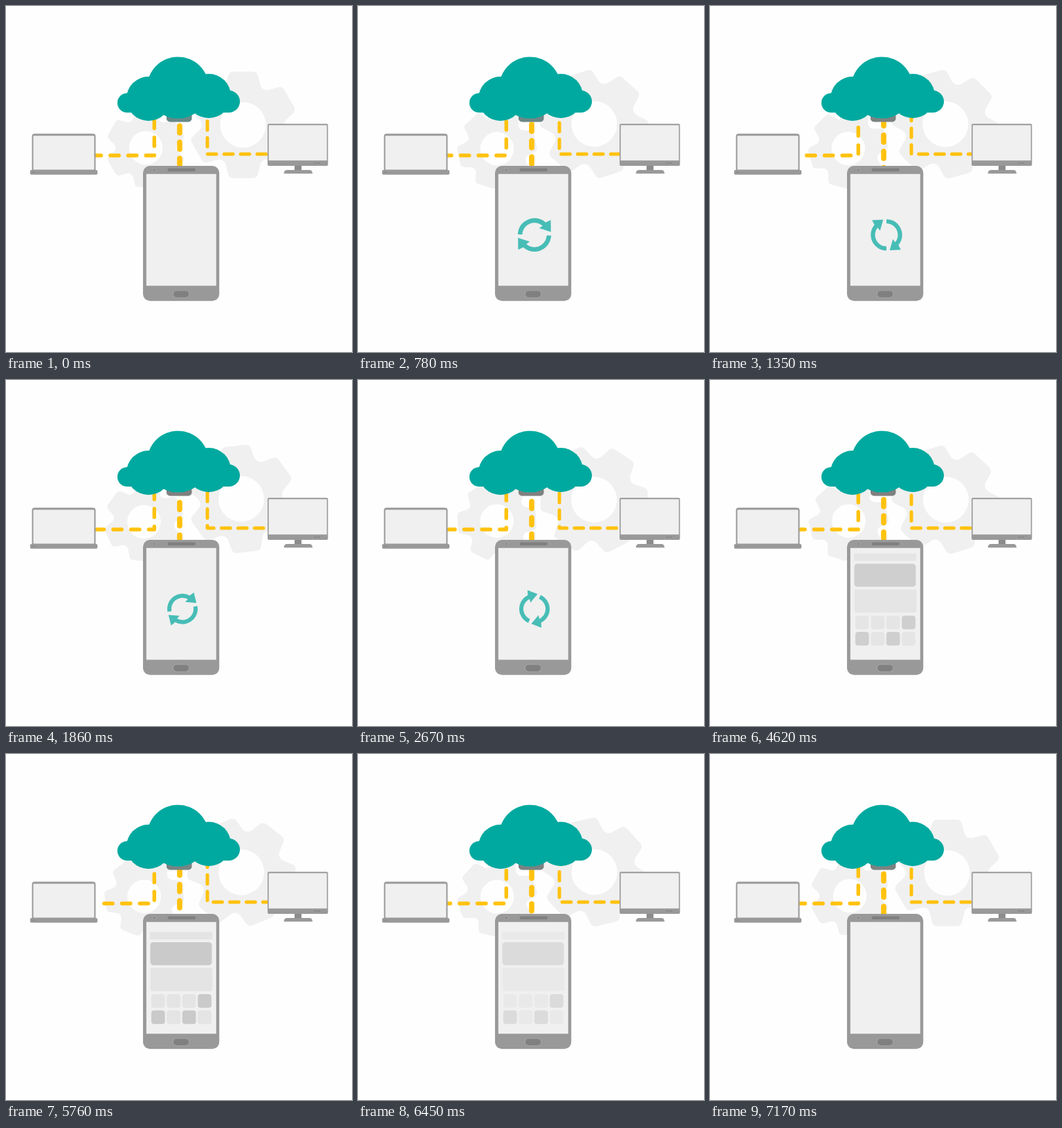
Recreate the animation shown at these times as an HTML page with a canvas. Size 500 px wide and 500 px high, loop 7230 ms.

```html
<!DOCTYPE html>
<html lang="en">
<head>
<meta charset="utf-8">
<title>Cloud sync</title>
<style>
html, body { margin: 0; width: 100%; height: 100%; overflow: hidden; background: #fefefe; }
canvas { display: block; width: 500px; height: 500px; }
</style>
</head>
<body>
<canvas id="stage"></canvas>
<script>
const LOOP = 7230, STEP = 30, LAST = 7170, TURN = 3600;
const TEAL = '#00a99f', YELLOW = '#ffc20e', GREY = '#999', DARK = '#808080', PALE = '#f0f0f0';
const TAU = Math.PI * 2, RAD = Math.PI / 180;

const canvas = document.getElementById('stage');
const ctx = canvas.getContext('2d');
const dpr = window.devicePixelRatio || 1;
canvas.width = canvas.height = 500 * dpr;

// Piecewise linear value from [time, value] pairs
function track(t, keys) {
  if (t <= keys[0][0]) return keys[0][1];
  for (let i = 1; i < keys.length; i++) {
    const [t0, a] = keys[i - 1], [t1, b] = keys[i];
    if (t <= t1) return a + (b - a) * (t - t0) / (t1 - t0);
  }
  return keys[keys.length - 1][1];
}

function box(x0, y0, x1, y1, r, color) {
  ctx.fillStyle = color;
  ctx.beginPath();
  ctx.roundRect(x0, y0, x1 - x0, y1 - y0, r);
  ctx.fill();
}

function disc(x, y, r, color) {
  ctx.fillStyle = color;
  ctx.beginPath();
  ctx.arc(x, y, r, 0, TAU);
  ctx.fill();
}

function polar(angle, r) {
  return [Math.cos(angle) * r, Math.sin(angle) * r];
}

// Six rounded teeth and a round hole; the pivot sits slightly off centre
function gear(x, y, scale, angle) {
  const pts = [];
  for (let i = 0; i < 6; i++) {
    const a = -Math.PI / 2 + i * TAU / 6;
    pts.push([...polar(a - 14.6 * RAD, 79.6), 8]);
    pts.push([...polar(a + 14.6 * RAD, 79.6), 8]);
    pts.push([...polar(a + 30 * RAD, 55), 10]);
  }
  ctx.save();
  ctx.translate(x, y);
  ctx.rotate(angle);
  ctx.translate(1.3, 0);
  ctx.scale(scale, scale);
  ctx.beginPath();
  const n = pts.length;
  ctx.moveTo((pts[0][0] + pts[n - 1][0]) / 2, (pts[0][1] + pts[n - 1][1]) / 2);
  pts.forEach((p, i) => {
    const q = pts[(i + 1) % n];
    ctx.arcTo(p[0], p[1], q[0], q[1], p[2]);
  });
  ctx.closePath();
  ctx.moveTo(33, 0);
  ctx.arc(0, 0, 33, 0, TAU);
  ctx.fillStyle = PALE;
  ctx.fill('evenodd');
  ctx.restore();
}

// Dashes centred at "first", moved by a number of periods along the path
function dashes(points, width, period, first, shift) {
  const visible = 17.8, dash = visible - width;
  ctx.strokeStyle = YELLOW;
  ctx.lineWidth = width;
  ctx.lineCap = ctx.lineJoin = 'round';
  ctx.setLineDash([dash, period - dash]);
  ctx.lineDashOffset = dash / 2 - first - shift * period;
  ctx.beginPath();
  points.forEach(([x, y]) => ctx.lineTo(x, y));
  ctx.stroke();
  ctx.setLineDash([]);
}

function cloud(t) {
  const glow = track(t, [[0, .21], [780, .16], [1500, 0], [5000, 0], [5760, .09], [LAST, .05]]);
  box(232, 145, 268.5, 167.5, 5, DARK);
  ctx.globalAlpha = glow;
  box(232, 145, 268.5, 167.5, 5, TEAL);
  ctx.globalAlpha = 1;
  disc(175, 140, 14, TEAL);
  disc(206, 134, 32, TEAL);
  disc(248.5, 118, 44.6, TEAL);
  disc(293, 130, 32, TEAL);
  disc(322, 138, 16, TEAL);
  box(175, 125, 322, 154, 0, TEAL);
}

function laptop() {
  box(37.5, 184.5, 129.5, 240, [4, 4, 0, 0], GREY);
  box(39.5, 187.5, 127.5, 236.5, 1, PALE);
  box(34.8, 237, 132.2, 243.7, 2, GREY);
  box(38, 239.8, 42, 240.8, .5, DARK);
}

function monitor() {
  box(417, 229, 427, 238, 0, '#8c8c8c');
  ctx.fillStyle = GREY;
  ctx.beginPath();
  ctx.moveTo(401.5, 242.3);
  ctx.quadraticCurveTo(402, 237, 406, 237);
  ctx.lineTo(438.5, 237);
  ctx.quadraticCurveTo(442.5, 237, 443, 242.3);
  ctx.fill();
  box(378, 170.3, 465.3, 231, 2, GREY);
  box(379.6, 172.2, 463.7, 223.2, .5, PALE);
  for (const x of [446.5, 449.8, 453]) disc(x, 227, 1, DARK);
}

function phone() {
  box(198, 231, 308.2, 426.3, 10, GREY);
  box(202.8, 242.8, 303.8, 404.3, 0, PALE);
  box(233.5, 234.4, 274, 239, 2.3, DARK);
  disc(214.2, 236.8, 2.2, '#adadad');
  disc(214.2, 236.8, 1.6, DARK);
  box(241.2, 410.8, 265, 421.6, 5, '#aaa');
  box(241.9, 411.5, 264.3, 420.9, 4.4, DARK);
}

function syncIcon(t) {
  const alpha = track(t, [[420, 0], [680, .7], [3300, .7], [3680, 0]]);
  const scale = track(t, [[420, 0], [680, 1.2], [780, 1.1], [1600, 1]]);
  if (alpha <= 0 || scale <= 0) return;
  ctx.save();
  ctx.translate(255, 330.8);
  ctx.rotate(Math.max(0, t - 780) * .1545 * RAD);
  ctx.scale(scale, scale);
  ctx.globalAlpha = alpha;
  ctx.fillStyle = TEAL;
  ctx.beginPath();
  for (const turn of [0, Math.PI]) {
    const at = (x, y) => [
      x * Math.cos(turn) - y * Math.sin(turn),
      x * Math.sin(turn) + y * Math.cos(turn)
    ];
    const from = turn + 182 * RAD, to = turn + 312 * RAD;
    ctx.moveTo(...polar(from, 22));
    ctx.arc(0, 0, 22, from, to);
    ctx.lineTo(...at(21.4, -19.5));
    ctx.lineTo(...at(21.6, -3.8));
    ctx.lineTo(...at(6.2, -8.8));
    ctx.lineTo(...polar(to, 16));
    ctx.arc(0, 0, 16, to, from, true);
    ctx.closePath();
  }
  ctx.fill();
  ctx.restore();
}

function appScreen(t) {
  const alpha = track(t, [[4000, 0], [4740, 1], [6000, 1], [7000, 0]]);
  if (alpha <= 0) return;
  const light = '#e4e4e4', strong = '#cacaca';
  ctx.save();
  ctx.beginPath();
  ctx.rect(202.8, 242.8, 101, 161.5);
  ctx.clip();
  ctx.translate(0, track(t, [[4000, -40], [4740, 0]]));
  ctx.globalAlpha = alpha;
  box(208, 257, 298.3, 268, 2, light);
  box(208.5, 272, 297.5, 305.2, 4.5, strong);
  box(208.7, 309, 298.3, 342.7, 3, light);
  for (let i = 0; i < 8; i++) {
    const x = 210 + (i % 4) * 22.4, y = i < 4 ? 347 : 370.5;
    box(x, y, x + 19.7, y + 19.8, 4, [3, 4, 6].includes(i) ? strong : light);
  }
  ctx.restore();
}

function draw(t) {
  // Everything mechanical runs forward, then backward
  const swing = track(t, [[0, 0], [TURN, 1], [LAST, 0]]);
  const shift = swing * 4.18;
  ctx.setTransform(dpr, 0, 0, dpr, 0, 0);
  ctx.fillStyle = '#fefefe';
  ctx.fillRect(0, 0, 500, 500);
  gear(341.2, 171.7, 1, -swing * TAU);
  gear(200.7, 205, .735, swing * TAU);
  dashes([[129, 216], [214.3, 216], [214.3, 150]], 5.4, 25.7, 28, shift);
  dashes([[378, 214], [291, 214], [291, 150]], 5, 23.9, 8.6, shift);
  dashes([[251, 155], [251, 240]], 7.6, 23.5, 23.3, shift);
  cloud(t);
  laptop();
  monitor();
  phone();
  syncIcon(t);
  appScreen(t);
}

const start = performance.now();
function tick() {
  const t = (performance.now() - start) % LOOP;
  draw(Math.min(LAST, Math.floor(t / STEP) * STEP));
  requestAnimationFrame(tick);
}
tick();
</script>
</body>
</html>
```
